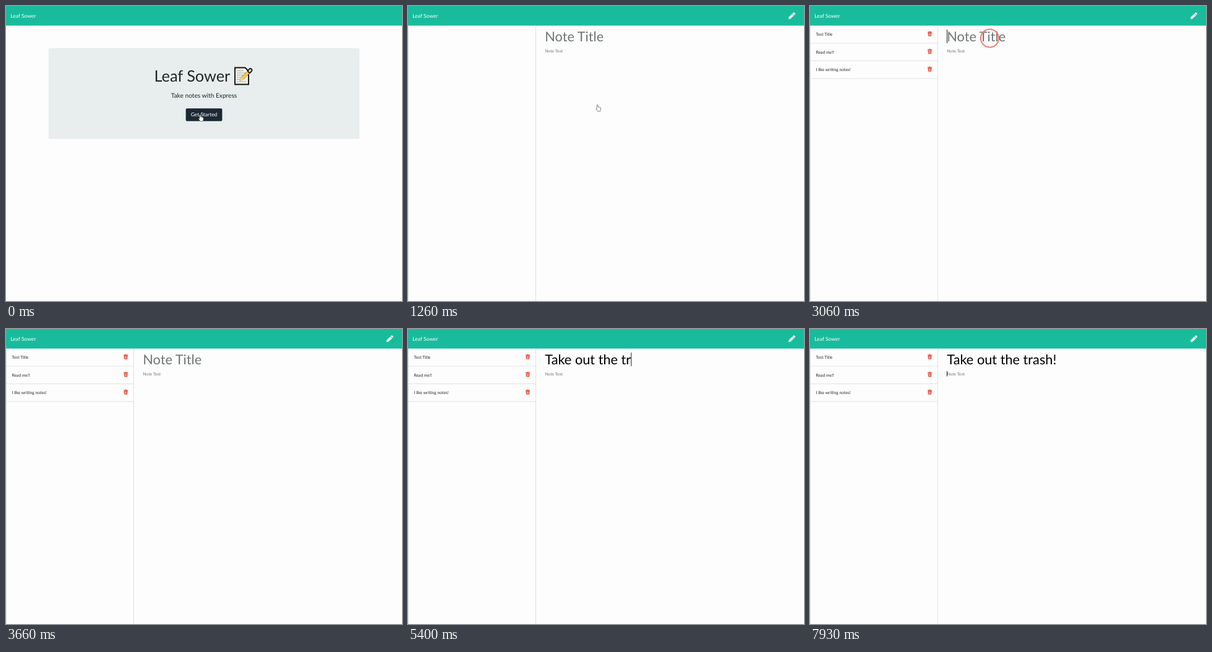
Write an HTML page that moves like this. It is 640 px wide and 476 px high and loops after 8 s.

```html
<!DOCTYPE html>
<html lang="en">
<head>
<meta charset="utf-8">
<title>Leaf Sower</title>
<style>
  html, body { margin: 0; width: 100%; height: 100%; overflow: hidden; background: #fdfdfd; }
  svg { display: block; width: 640px; height: 476px; }
  text { font-family: Lato, sans-serif; font-size: 6.79px; fill: #212529; white-space: pre; text-rendering: geometricPrecision; }
  .brand { font-size: 8.48px; fill: #fff; }
  .hero { font-size: 25.3px; }
  .lead { font-size: 10.18px; }
  .heading { font-size: 21.72px; }
  .hint { fill: #6f7673; }
  .rule { stroke: #dfe2e2; }
</style>
</head>
<body>
<svg viewBox="0 0 640 476">
  <defs>
    <g id="bin" fill="#e74c3c">
      <path d="M0 1.1h2l.6-.8h2l.6.8h2v1.2H0z"/>
      <path fill-rule="evenodd" d="M.5 2.6h6.2l-.4 5q-.1.8-.8.8H1.7q-.7 0-.8-.8zM1.9 3.7v3.6h.5V3.7zM3.35 3.7v3.6h.5V3.7zM4.8 3.7v3.6h.5V3.7z"/>
    </g>
  </defs>

  <rect width="640" height="476" fill="#fdfdfd"/>
  <rect width="640" height="31.6" fill="#18bc9c"/>
  <text class="brand" x="7.3" y="18.9">Leaf Sower</text>

  <g id="home">
    <rect x="68.8" y="68" width="502.4" height="146.5" rx="2" fill="#e8eeed"/>
    <text class="hero" x="239.5" y="121.6">Leaf Sower</text>
    <g transform="translate(368 98)">
      <path d="M2 1.5H18.5L24 7V28.5H2z" fill="#f4f2e9" stroke="#111" stroke-width="1.9"/>
      <path d="M5 6.5H16M5 10H19M5 13.5H17M5 17H13M5 20.5H10M5 24H20" stroke="#a3a5a5" stroke-width="1"/>
      <path d="M10 22.5L12 17 24 5.5 27.2 8.8 15.5 20.4z" fill="#f6c84c" stroke="#7b6220" stroke-width=".6"/>
      <path d="M10 22.5L12 17 15.5 20.4z" fill="#efd9b0"/>
      <path d="M22.5 7L25 4Q27 2 28.8 3.9T28.5 7.6L25.8 10.3z" fill="#d8d8d6" stroke="#111" stroke-width="1.8"/>
    </g>
    <text class="lead" x="320" y="148" text-anchor="middle">Take notes with Express</text>
    <rect id="focus" x="289.5" y="164.2" width="61" height="22.7" rx="2.6" fill="#8799a8"/>
    <rect x="290.6" y="165.2" width="58.8" height="20.6" rx="2" fill="#1c2935"/>
    <text class="brand" x="320" y="178.4" text-anchor="middle">Get Started</text>
  </g>

  <g id="notes">
    <path class="rule" d="M.5 31.6V476M206.5 31.6V476"/>
    <g id="list"></g>
    <g transform="translate(615 10.2) scale(.0213)" fill="#fff">
      <path d="M291 93L419 221 141 499 27 512Q-2 513 0 485L13 371zM498 74Q526 108 498 142L441 199 313 71 370 14Q404-14 438 14z"/>
    </g>
    <text class="heading" id="title" x="221.3" y="56.8"></text>
    <text class="hint" x="221.3" y="74.8">Note Text</text>
    <rect id="caret" width="1" fill="#222"/>
  </g>

  <path id="hand" d="M1.3 6V1Q2.2-.5 3.1 1V4Q4-.1+4.1 4.6 4.1Q5.7 3.8 6 4.6 7.5 4.4 7.5 6V8.3L6.5 11H2.4L.1 7.4Q-.8 5.6 1.3 6.6z" fill="#fff" stroke="#555" stroke-width=".7"/>
  <circle id="ring" r="14.6" fill="none" stroke="#ee7f7b" stroke-width="2"/>
</svg>
<script>
const LOOP = 8000, PHRASE = 'Take out the trash!';
const KEYS = [4260, 4330, 4400, 4460, 4600, 4660, 4800, 4870, 4930, 5000,
              5060, 5130, 5200, 5260, 5400, 5660, 5800, 5930, 6260];
const CLICKS = [{ at: 600, length: 150, x: 314, y: 177.5 }, { at: 3060, length: 200, x: 290.5, y: 52 }];
const $ = id => document.getElementById(id);
const show = (id, on) => $(id).style.display = on ? '' : 'none';
const set = (id, attrs) => Object.entries(attrs).forEach(([k, v]) => $(id).setAttribute(k, v));

set('hand', { d: 'M1.3 6V1Q2.2-.6 3.1 1V4Q4 3.6 4.6 4.2 5.6 3.8 6 4.7 7.5 4.5 7.5 6V8.3L6.5 11H2.4L.1 7.4Q-.6 5.6 1.3 6.6z' });
$('list').innerHTML = ['Test Title', 'Read me!!', 'I like writing notes!'].map((name, i) => {
  const y = 28.5 * i;
  return `<text x="9.5" y="${48.3 + y}">${name}</text>
    <use href="#bin" x="190" y="${40.4 + y}"/>
    <path class="rule" d="M0 ${60 + y}H206.5"/>`;
}).join('');

function drawCaret(t, typed) {
  const inText = t >= 7930;
  const lastReset = KEYS.filter(k => k <= t).pop() || 3060;
  const lit = Math.floor((t - lastReset) / 535) % 2 === 0;
  show('caret', inText || t >= 3060 && lit);
  const x = inText || !typed ? 221 : 221.3 + $('title').getComputedTextLength();
  set('caret', { x, y: inText ? 68 : 38, height: inText ? 8.5 : 22 });
}

function draw(t) {
  const opened = t >= 1260;
  show('home', !opened);
  show('notes', opened);
  show('focus', t >= 600);
  show('list', t >= 1330);

  const typed = KEYS.filter(k => k <= t).length;
  $('title').textContent = typed ? PHRASE.slice(0, typed) : 'Note Title';
  $('title').style.fill = typed ? '#000' : '#6f7673';
  drawCaret(t, typed);

  const moved = t < 930 ? 0 : t < 1000 ? .5 : 1;
  show('hand', t < 1800);
  set('hand', { transform: `translate(${311.5 - 7.5 * moved} ${175 - 16 * moved})` });

  const click = CLICKS.find(c => t >= c.at && t < c.at + c.length);
  show('ring', click);
  if (click) {
    const fade = Math.min(1, 1.3 * (1 - (t - click.at) / click.length));
    set('ring', { cx: click.x, cy: click.y, opacity: fade });
  }
}

function tick() {
  draw(performance.now() % LOOP);
  requestAnimationFrame(tick);
}
tick();
</script>
</body>
</html>
```
